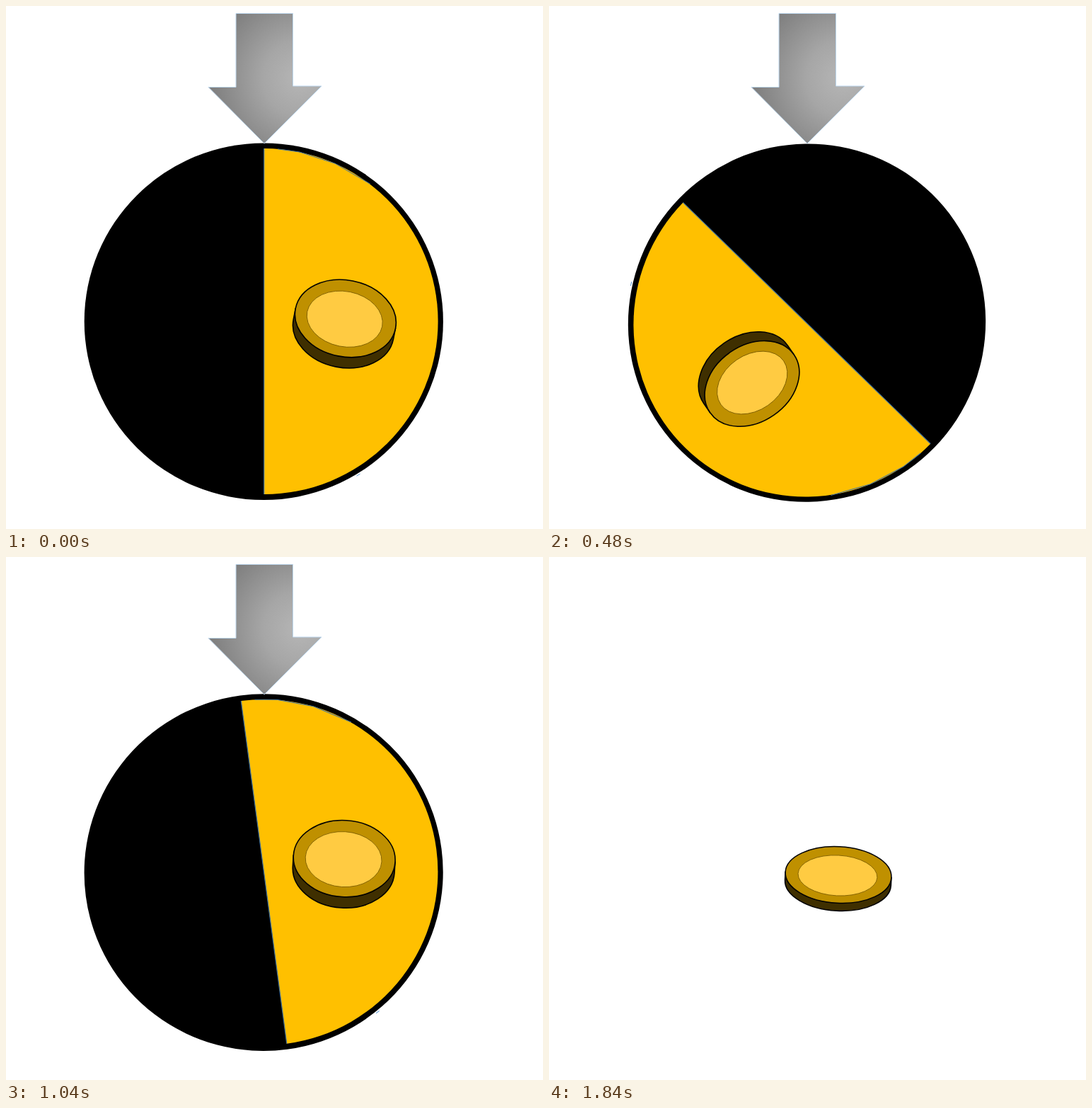
Recreate the animation shown at these times as an HTML page. Size 759 by 738 pixels, loop 2 s.

```html
<!DOCTYPE html>
<html lang="en">
<head>
<meta charset="utf-8">
<title>Spinning wheel</title>
<style>
  html, body { margin: 0; width: 100%; height: 100%; overflow: hidden; background: #fff; }
  svg { display: block; width: 759px; height: 738px; }
</style>
</head>
<body>
<svg viewBox="0 0 759 738">
  <defs>
    <radialGradient id="steel" gradientUnits="userSpaceOnUse" cx="416" cy="102" r="132">
      <stop offset="0" stop-color="#b6b6b6"/>
      <stop offset=".4" stop-color="#a6a6a6"/>
      <stop offset="1" stop-color="#7c7c7c"/>
    </radialGradient>
  </defs>
  <g id="scene">
    <g id="wheel">
      <ellipse cx=".3" cy="-1" rx="253.6" ry="251.8"/>
      <path d="M.7-245.2A246 244 0 0 1 .7 242.8Z" fill="#ffc000"/>
      <g fill="none" stroke="#41719c">
        <path d="M.7-245.2V242.8" stroke-width="1.2"/>
        <path d="M20-244.4L51-240.2L101-224L151-195"/>
        <path d="M131.5 217L136.5 214" stroke="#5b9bd5"/>
      </g>
    </g>
    <path d="M325 10.5H405.5V113H446L365 194L286 114.5H325Z" fill="url(#steel)" stroke="#bdd7ee"/>
  </g>
  <g id="coin">
    <path id="side" fill="#3f2f00" stroke="#000" stroke-width="1.6"/>
    <ellipse id="rim" fill="#bf9000" stroke="#000" stroke-width="1.6"/>
    <ellipse id="face" cx="-1" cy="1" fill="#ffcb42" stroke="#7f6000" stroke-width=".9"/>
  </g>
</svg>
<script>
const STEP = 80, LOOP = 2000, EXIT_STEP = 21, EXIT_STEPS = 3;
const PIVOT = { x: 364, y: 446.2 };
const FINAL_ANGLE = 1788.8;

// [step, angle in degrees, degrees per step]: a fast spin with a damped stop
const SPIN = [
  [0, 0, 0], [4, 1200, 261], [7, 1673.1, 77],
  [9, 1769.4, 24], [13, 1792.4, -0.5], [16, FINAL_ANGLE, -0.7]
];
const ON_WHEEL = { rx: 72, ry: 54, depth: 15.5, faceRx: 54, faceRy: 39 };
const LANDED = { x: 409, y: 448.5, tilt: 3, rx: 75, ry: 39.8, depth: 11, faceRx: 56, faceRy: 28.5 };

const el = id => document.getElementById(id);
const set = (id, attrs) => {
  for (const name in attrs) el(id).setAttribute(name, attrs[name]);
};

function spinAngle(step) {
  const next = SPIN.findIndex(key => key[0] > step);
  if (next < 0) return FINAL_ANGLE;
  const [t0, a0, v0] = SPIN[next - 1], [t1, a1, v1] = SPIN[next];
  const span = t1 - t0, s = (step - t0) / span, r = 1 - s;
  return a0 * r * r * (1 + 2 * s) + a1 * s * s * (3 - 2 * s)
    + span * s * r * (v0 * r - v1 * s);
}

function wheelCoin(angle) {
  const a = (angle - 2.6) * Math.PI / 180;
  return {
    ...ON_WHEEL,
    x: PIVOT.x + 116 * Math.cos(a),
    y: PIVOT.y + 116 * Math.sin(a),
    tilt: angle - FINAL_ANGLE
  };
}

function mix(from, to, p) {
  const out = {};
  for (const key in to) out[key] = from[key] + (to[key] - from[key]) * p;
  return out;
}

function drawCoin(c) {
  set('coin', { transform: `translate(${c.x} ${c.y}) rotate(${c.tilt})` });
  set('side', { d: `M${-c.rx} 0V${c.depth}A${c.rx} ${c.ry} 0 0 0 ${c.rx} ${c.depth}V0Z` });
  set('rim', { rx: c.rx, ry: c.ry });
  set('face', { rx: c.faceRx, ry: c.faceRy });
}

function draw(time) {
  const step = Math.floor((time % LOOP) / STEP);
  const angle = spinAngle(step);
  const exit = Math.min(1, Math.max(0, (step - EXIT_STEP + 1) / EXIT_STEPS));
  set('wheel', { transform: `translate(${PIVOT.x} ${PIVOT.y}) rotate(${angle})` });
  set('scene', { visibility: exit ? 'hidden' : 'visible' });
  drawCoin(mix(wheelCoin(angle), LANDED, exit));
}

let start;
function tick(now) {
  start ??= now;
  draw(now - start);
  requestAnimationFrame(tick);
}
draw(0);
requestAnimationFrame(tick);
</script>
</body>
</html>
```
